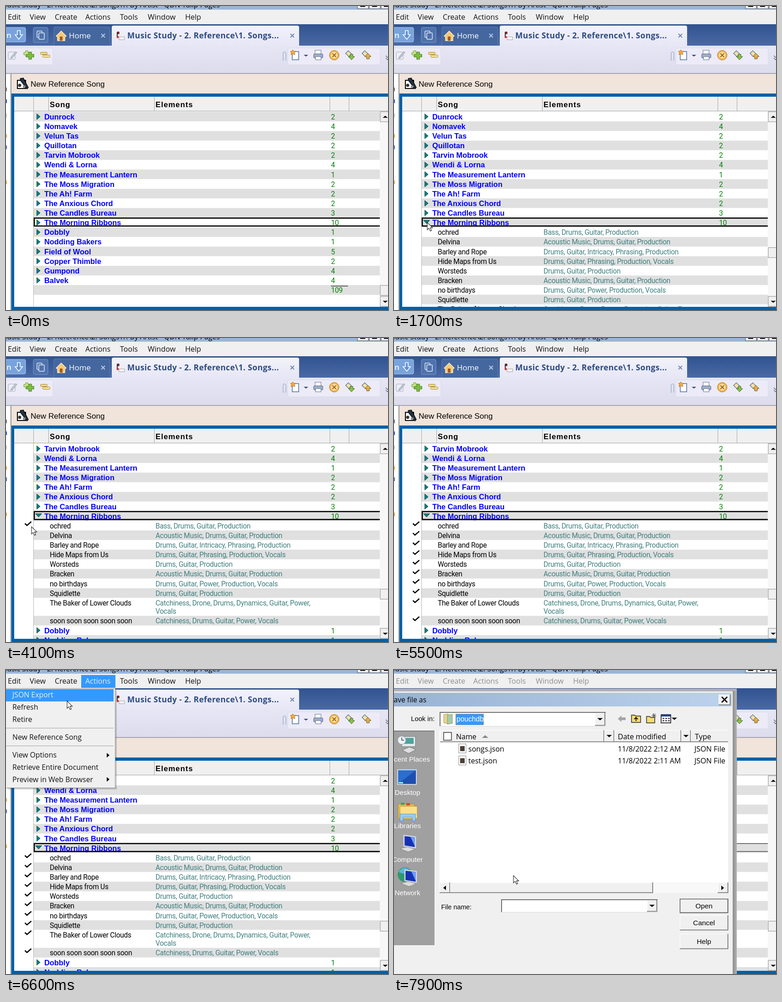
Write an HTML page that moves like this. It is 838 px wide and 667 px high and loops after 8 s.

```html
<!DOCTYPE html>
<html lang="en">
<head>
<meta charset="utf-8">
<title>Music Study</title>
<style>
  html, body { margin: 0; width: 100%; height: 100%; overflow: hidden; background: #f0f0f0; }
  svg { display: block; width: 838px; height: 667px; }
  text { white-space: pre; }
  .ui { font-family: "Open Sans", "Noto Sans", sans-serif; }
  .list { font-family: "Liberation Sans", Arial, sans-serif; }
  .cell { font-family: Roboto, "Liberation Sans", sans-serif; letter-spacing: -.3px; }
  .sel { fill: none; stroke: #000; stroke-width: 2.6; }
  .inactive .sel { stroke-width: 1; }
  .inactive #menu text { fill: #8e8e8e; }
</style>
</head>
<body>
<svg id="stage" viewBox="0 0 838 667" xmlns="http://www.w3.org/2000/svg"></svg>
<script>
const LOOP = 8000, STEP = 100, PITCH = 21.13, EXTRA = 18.4;
const BLUE = '#3399ff', FACE = '#f0f0f0', FRAME = '#0060a8', STRIPE = '#e0e0e0';

// Markup helpers
const rect = (x, y, w, h, fill, more = '') =>
  `<rect x="${x}" y="${y}" width="${w}" height="${h}" fill="${fill}" ${more}/>`;
const path = (d, fill, stroke = 'none', width = 1) =>
  `<path d="${d}" fill="${fill}" stroke="${stroke}" stroke-width="${width}"/>`;
const circle = (x, y, r, fill, more = '') => `<circle cx="${x}" cy="${y}" r="${r}" fill="${fill}" ${more}/>`;
const esc = s => s.replace(/&/g, '&amp;');
const text = (font, x, y, s, size, fill = '#000', more = '') =>
  `<text class="${font}" x="${x}" y="${y}" font-size="${size}" fill="${fill}" ${more}>${esc(s)}</text>`;
const ui = (...a) => text('ui', ...a);
const list = (...a) => text('list', ...a);
const cell = (x, y, s, fill) => text('cell', x, y, s, 15.6, fill);
const group = (id, body, more = '') => `<g id="${id}" ${more}>${body}</g>`;
const bevel = (x, y, w, h) => rect(x, y, w, h, FACE) +
  path(`M${x + .5} ${y + h}V${y + .5}H${x + w}`, 'none', '#fff') +
  path(`M${x} ${y + h - .5}H${x + w - .5}V${y}`, 'none', '#696969', 1.6);
const sunken = (x, y, w, h) => rect(x, y, w, h, '#fff') +
  path(`M${x + 1} ${y + h}V${y + 1}H${x + w}`, 'none', '#707070', 2) +
  path(`M${x} ${y + h - .5}H${x + w - .5}V${y}`, 'none', '#d8d8d8');
const tri = (x, y, dx, dy, fill = '#000') => dx
  ? path(`M${x - dx / 2} ${y - dy}L${x + dx / 2} ${y}L${x - dx / 2} ${y + dy}Z`, fill)
  : path(`M${x - Math.abs(dy) - 1} ${y - dy / 2}h${2 * Math.abs(dy) + 2}L${x} ${y + dy / 2}Z`, fill);

const bands = `Dunrock 2,Nomavek 4,Velun Tas 2,Quillotan 2,Tarvin Mobrook 2,Wendi & Lorna 4,
The Measurement Lantern 1,The Moss Migration 2,The Ah! Farm 2,The Anxious Chord 2,The Candles Bureau 3,
The Morning Ribbons 10,Dobbly 1,Nodding Bakers 1,Field of Wool 5,Copper Thimble 2,Gumpond 4,Balvek 4`
  .split(',').map(s => { const [, name, count] = s.trim().match(/(.+) (\d+)$/); return { name, count }; });
const OPEN = 11;

const songs = [
  ['ochred', 'Bass, Drums, Guitar, Production'],
  ['Delvina', 'Acoustic Music, Drums, Guitar, Production'],
  ['Barley and Rope', 'Drums, Guitar, Intricacy, Phrasing, Production'],
  ['Hide Maps from Us', 'Drums, Guitar, Phrasing, Production, Vocals'],
  ['Worsteds', 'Drums, Guitar, Production'],
  ['Bracken', 'Acoustic Music, Drums, Guitar, Production'],
  ['no birthdays', 'Drums, Guitar, Power, Production, Vocals'],
  ['Squidlette', 'Drums, Guitar, Production'],
  ['The Baker of Lower Clouds', 'Catchiness, Drone, Drums, Dynamics, Guitar, Power,', 'Vocals'],
  ['soon soon soon soon soon', 'Catchiness, Drums, Guitar, Power, Vocals']
].map(([name, ...tags]) => ({ name, tags }));

function bandRow(b, y, open) {
  const mark = open
    ? path(`M64.5 ${y - 5.5}h14l-7 7.5z`, '#008080', '#033', .8)
    : path(`M67.5 ${y - 6.5}v12.5l7.5-6.2z`, '#008080', '#033', .8);
  return mark + list(84, y + 5.8, b.name, 16.4, '#0000ff', 'font-weight="700"') +
    cell(713, y + 5.8, b.count, '#008000');
}

function songRow(s, y) {
  return cell(96, y + 5.8, s.name, '#000') +
    s.tags.map((line, i) => cell(328, y + 5.8 + i * EXTRA, line, '#408080')).join('');
}

function rowsView(id, first, open, thumbY) {
  const rows = bands.slice();
  if (open) rows.splice(OPEN + 1, 0, ...songs);
  else rows.push({ total: '109' });
  let y = 243, out = '', sel = '';
  rows.slice(first).forEach((row, i) => {
    if (y > 675) return;
    const h = PITCH + (row.tags && row.tags[1] ? EXTRA : 0);
    out += rect(61, y - 11, 759, h + .3, (i % 2 === 0) !== open ? STRIPE : '#fff');
    if (row.total) out += rect(713, y - 9.5, 37, 1.3, '#222') + cell(713, y + 5.8, row.total, '#008000');
    else if (row.tags) out += songRow(row, y);
    else out += bandRow(row, y, open && row === bands[OPEN]);
    if (row === bands[OPEN]) sel = `<rect class="sel" x="62" y="${y - 10.1}" width="790" height="17.4"/>`;
    y += h;
  });
  const thumb = rect(821, thumbY, 18, 22, FACE, 'stroke="#8a8a8a"');
  return group(id, `<g clip-path="url(#rows)">${out}${sel}</g>` + thumb);
}

function checks() {
  return songs.map((s, i) => {
    const y = 412 + i * PITCH + (i > 8 ? EXTRA : 0);
    return `<g class="check">${path(`M41.5 ${y - 5}l4.5 4.2 9.5-8.2`, 'none', '#000', 2.6)}</g>`;
  }).join('');
}

function topBars() {
  const menus = [['Edit', 4], ['View', 52], ['Create', 107], ['Actions', 174], ['Tools', 250], ['Window', 311], ['Help', 393]];
  return rect(0, 0, 838, 8, '#9ab5d8') +
    ui(469, 3, 'Music Study - 2. Reference\\2. Songs\\1. By Artist - QDN Tulip Pages', 15.8, '#000', 'text-anchor="end"') +
    [771, 797, 823].map(x => rect(x, -14, 24, 20, FACE, 'stroke="#555"') + rect(x + 6, 0, 11, 2, '#111')).join('') +
    rect(0, 8, 838, 33, FACE) +
    group('hot', rect(165, 11, 75, 28, BLUE)) +
    group('menu', menus.map(([s, x]) => ui(x, 29.5, s, 16.2, '#111', s === 'Actions' ? 'id="actions"' : '')).join('')) +
    rect(0, 40, 838, 48, 'url(#bar)') +
    // Open button and switcher
    rect(-8, 47, 51, 32, '#79a3dc', 'rx="3" stroke="#b4cdf0"') +
    ui(1, 70, 'n', 17, '#fff', 'font-weight="600"') +
    path('M25 54h6v9h5l-8 10-8-10h5z', '#5f8fd2', '#fff', 1.6) +
    rect(60, 47, 32, 33, '#4f72ad', 'rx="3" stroke="#7f9bca"') +
    rect(68, 55, 11, 14, 'none', 'rx="1.5" stroke="#e3ebf8" stroke-width="1.5"') +
    rect(72, 59, 12, 14, '#4f72ad', 'rx="1.5" stroke="#e3ebf8" stroke-width="1.5"') +
    // Home tab
    rect(105, 46, 123, 44, '#45679f', 'rx="3" stroke="#6480b2"') +
    path('M110 66l11-11 11 11-3 2v8h-16v-8z', '#f4c878', '#fff1d0', 1.4) + rect(118, 67, 6, 9, '#a55b20') +
    ui(138, 71, 'Home', 17, '#fff') +
    path('M209 61l8 8m0-8l-8 8', 'none', '#b9c9e6', 2) +
    // Toolbar and active tab
    rect(0, 87, 838, 60, 'url(#tool)') +
    path('M232 88V47q0-4 4-4H639q4 0 4 4V88z', 'url(#tab)') +
    circle(246, 59, 3, '#7a2a20') + rect(243, 57, 2, 10, '#333') + circle(245, 68, 2.5, '#c33') +
    rect(248, 68, 12, 6, '#fff', 'stroke="#999"') +
    ui(266, 71, 'Music Study - 2. Reference\\1. Songs...', 17.4, '#2c4a80', 'font-weight="700" letter-spacing=".4"') +
    path('M624 61l8 8m0-8l-8 8', 'none', '#7487ad', 2);
}

function arrowIcon(x, y, fill, dir) {
  return path(`M${x - 10} ${y - 4}l6-6 7 7-6 6z`, '#f5e2a0', '#4a6a9a', 1.2) +
    `<g transform="translate(${x + 3} ${y + 3}) scale(1 ${dir})">${path('M-3-5h6v5h4l-7 7-7-7h4z', fill, '#4c5d38', 1)}</g>`;
}

function toolbar() {
  const box = 'rx="4" stroke="#d9d9e8"';
  return rect(-8, 92, 111, 37, '#ecebf7', box) + rect(618, 92, 203, 37, '#ecebf7', box) +
    rect(5, 101, 15, 16, '#eceff5', 'stroke="#a2a7b5" rx="2"') + path('M11 112l10-12 3 2-10 12-4 1z', '#c4c8d4', '#8f95a5') +
    path('M43 98h5v4h5v5h-5v4h-5v-4h-4v-5h4z', '#c9e58a', '#6a9a35') +
    path('M50 101h6v5h5v6h-5v5h-6v-5h-5v-6h5z', '#7dc03e', '#477b24', 1.2) +
    rect(75.5, 101.5, 15, 5, '#f2d878', 'rx="2" stroke="#a5843a"') + rect(80.5, 107.5, 16, 5, '#f7e39a', 'rx="2" stroke="#a5843a"') +
    path('M608 120v-17q3-5 6 0v17', 'none', '#a9b4ce', 1.6) +
    rect(628, 100, 14, 18, '#fff', 'stroke="#4e6fa5" stroke-width="1.5"') +
    path('M629 96l2 3 4 0-2 4 1 4-5-2-4 2 1-4-2-4 4 0z', '#f4a93c', '#b06c14', .8) +
    tri(658, 109, 0, 4, '#3c4d77') +
    rect(678, 97, 13, 9, '#fff', 'stroke="#5c6c8c"') + rect(675, 105, 20, 9, '#9fb0cb', 'rx="2" stroke="#4b5c7d"') +
    rect(679, 111, 12, 7, '#fff', 'stroke="#5c6c8c"') +
    circle(720, 108, 10.5, '#f3b64c', 'stroke="#b5761b"') + circle(720, 108, 7, '#fbe5b1') +
    path('M716 104l8 8m0-8l-8 8', 'none', '#a8681c', 2.4) +
    arrowIcon(755, 108, '#86c440', 1) + arrowIcon(791, 108, '#f5a83a', -1) +
    path('M833 109l4 4 4-4m-8 5l4 4 4-4', 'none', '#667', 1.3);
}

function panel() {
  const specks = [[183, '#777'], [209, '#35c'], [240, '#ccc'], [285, '#e8b030'], [310, '#4a70c0'], [387, '#e8b030']];
  return rect(0, 147, 838, 520, '#f4f4f4') + rect(0, 147, 838, 2, '#a6a6b0') +
    rect(0, 149, 9, 518, '#fff') + rect(9, 149, 3, 518, '#c4c4c4') +
    specks.map(([y, c]) => rect(0, y - 4, 2, 8, c)).join('') +
    rect(12, 149, 826, 44, '#f1e4da') + rect(11, 148, 1, 519, '#8a8a8a') +
    rect(25, 163, 18, 18, '#fff', 'stroke="#000" stroke-width="2"') + circle(30, 174, 3.5, '#333') +
    path('M31 159l7-1 11 21-3 3-14-18z', '#234', '#000', 1.2) + circle(40, 177, 3, '#888') +
    list(54, 177, 'New Reference Song', 17.1) +
    rect(12, 192, 826, 475, FRAME) + rect(18, 199, 820, 461, '#fff') +
    rect(18, 199, 820, 31, FACE) + rect(18, 230, 820, 1, '#a0a0a0') +
    [60, 93, 325, 710, 752].map(x => rect(x, 199, 1, 31, '#a5a5a5')).join('') +
    list(96, 222, 'Song', 16.6, '#000', 'font-weight="700" letter-spacing="1"') +
    list(328, 222, 'Elements', 16.6, '#000', 'font-weight="700" letter-spacing="1.1"') +
    rect(60, 231, 1, 429, '#b4b4b4') + rect(820, 231, 18, 429, '#f7f7f7') +
    [232, 637].map(y => rect(821, y, 18, 22, FACE, 'stroke="#8a8a8a"')).join('') +
    tri(832, 243, 0, -4.5) + tri(832, 649, 0, 4.5);
}

function popup() {
  const items = [['Refresh', 86.5], ['Retire', 113.5], ['New Reference Song', 152.5], ['View Options', 192],
    ['Retrieve Entire Document', 219], ['Preview in Web Browser', 245.5]];
  return rect(3, 44, 240, 218, '#000', 'opacity=".18"') +
    rect(-2, 40.5, 241.5, 218, FACE, 'stroke="#9a9a9a"') +
    group('pick', rect(0, 42, 236, 27, BLUE)) +
    ui(14, 60, 'JSON Export', 15.85, '#111', 'id="export"') +
    items.map(([s, y]) => ui(14, y, s, 15.85, '#111')).join('') +
    [127, 166].map(y => rect(0, y, 236, 1, '#a0a0a0')).join('') +
    tri(224, 187, 6, 5) + tri(224, 240, 6, 5);
}

function monitor(x, y) {
  return path(`M${x - 13} ${y - 18}l25 3v24l-25-4z`, '#1632b4', '#d4dbe8', 2.5) +
    path(`M${x + 1} ${y - 15}l10 1.500v20z`, '#6f9cf0') + path(`M${x - 22} ${y + 11}l16-4 18 5-16 6z`, '#dcdcdc', '#777', .8);
}

function places() {
  const names = ['Recent Places', 'Desktop', 'Libraries', 'Computer', 'Network'];
  return rect(0, 133, 90, 472, '#a0a0a0') + path('M0 604.5H89.5V133', 'none', '#fff', 1) + rect(0, 133, 88, 1.5, '#6b6b6b') +
    names.map((s, i) => list(29.5, 201 + i * 73.2, s, 15.3, '#fff', 'text-anchor="middle"')).join('') +
    rect(17, 146, 30, 22, '#e3eaec', 'rx="2" stroke="#6c7c80"') + rect(21, 149, 22, 13, '#4fa39c') +
    circle(17, 154, 9, '#eef2f4', 'stroke="#8a9aa5"') + path('M17 148v6h5', 'none', '#345', 1.5) +
    path('M18 176l16-7 14 6-16 8z', '#ddd', '#777') +
    rect(8, 219, 41, 32, '#2a6fd0', 'stroke="#cfd8e6" stroke-width="2"') + path('M9 250L48 220V250z', '#1d4fb0') + rect(10, 246, 10, 3, '#8fd') +
    rect(9, 294, 36, 32, '#e8bf52', 'rx="2" stroke="#a98224"') + rect(15, 291, 8, 5, '#4aa05a') + rect(27, 292, 8, 5, '#c8513a') +
    rect(13, 299, 38, 27, '#f8e08e', 'rx="2" stroke="#b18f38"') + path('M13 331v-15h34v15h-7v-8H20v8z', '#9ccbf0', '#5b8fc0') +
    monitor(35, 381) + circle(24, 449, 16, '#2f9a6a') + path('M10 443q14-18 28 0-12 8-28 0z', '#5ab4e8') + monitor(37, 457);
}

function fileRow(y, name, time) {
  return rect(142, y - 11, 16, 20, '#fff', 'stroke="#888"') + rect(145, y - 6, 10, 11, '#4a4038') +
    ui(163, y + 5.5, name, 16) + ui(491, y + 5.5, '11/8/2022 ' + time, 15.75) + ui(659, y + 5.5, 'JSON File', 16.2);
}

function dialog() {
  const drop = (x, y, w, h) => bevel(x, y, w, h) + tri(x + w / 2, y + h / 2, 0, 5);
  const button = (y, s, h) => bevel(627, y, 106, h) + list(680, y + h / 2 + 5, s, 15.4, '#000', 'text-anchor="middle"');
  return rect(0, 41, 752, 626, '#b2b2b2') + rect(743, 46, 9, 621, 'url(#edge)') + rect(0, 47, 743, 620, FACE) +
    rect(0, 50, 741, 30, 'url(#caption)') + ui(-9, 71, 'Save file as', 15.6) +
    bevel(712, 54, 26, 23) + path('M719 59l12 12m0-12l-12 12', 'none', '#000', 2.6) +
    list(89, 112, 'Look in:', 14.8, '#000', 'text-anchor="end"') +
    sunken(100, 92, 365, 32) +
    path('M109 98l10-2v22l-10-2z', '#e9d48a', '#b09a50') + path('M117 99l11-2v20l-11 2z', '#a9cba4', '#789c78') +
    rect(135.5, 96.5, 61, 24, BLUE, 'stroke="#c60" stroke-dasharray="1.4"') + list(137, 113, 'pouchdb', 15.6, '#fff') + drop(441, 94, 22, 28) +
    // Folder tools
    path('M491 107l8-7v4h9v6h-9v4z', '#a4a4a4') +
    path('M521 99h7l2 2h11v14h-20z', '#f5dd6c', '#222', 1.4) + path('M531 112v-7m-4 3l4-4 4 4', 'none', '#111', 1.8) +
    path('M554 102h7l2 2h9v12h-18z', '#f5dd6c', '#222', 1.4) + path('M570 95v10m-5-5h10m-8-4l7 8m0-8l-7 8', 'none', '#333', 1) +
    rect(586, 98, 21, 18, '#fff', 'stroke="#111" stroke-width="1.6"') + rect(586, 98, 21, 4, '#23408f') +
    [0, 1, 2].map(i => rect(589 + i * 6, 105, 4, 2.5, '#445') + rect(589 + i * 6, 110, 4, 2.5, '#445')).join('') +
    tri(615, 107, 0, 5) +
    // File list
    rect(100, 132, 633, 334, '#fff') + bevel(101, 132, 360, 26) + drop(461, 132, 22, 26) + bevel(483, 132, 147, 26) +
    drop(630, 132, 21, 26) + bevel(651, 132, 84, 26) + rect(733, 130, 8, 30, FACE) +
    rect(109, 137, 17, 17, '#fff', 'stroke="#444" stroke-width="1.6"') + ui(136, 151.5, 'Name', 16) +
    tri(200, 146, 0, -6, '#888') + ui(491, 151.5, 'Date modified', 16) + ui(660, 151.5, 'Type', 16.3) +
    fileRow(173, 'songs.json', '2:12 AM') + fileRow(199.5, 'test.json', '2:11 AM') +
    rect(100, 466, 633, 23, '#f8f8f8') + bevel(100, 466, 23, 23) + bevel(123, 466, 445, 23) + bevel(710, 466, 23, 23) +
    tri(111, 478, -6, 5) + tri(721, 478, 6, 5) +
    // Name field and buttons
    list(103.5, 524.5, 'File name:', 14.3) + sunken(235, 503, 344, 29) + drop(555, 505, 22, 25) +
    button(502, 'Open', 31) + rect(627.5, 502.5, 105, 30, 'none', 'stroke="#555" stroke-width="1.4"') +
    button(538, 'Cancel', 33) + button(579, 'Help', 33) + places();
}

const gradient = (id, a, b, dir = 'x2="0" y2="1"') =>
  `<linearGradient id="${id}" ${dir}><stop stop-color="${a}"/><stop offset="1" stop-color="${b}"/></linearGradient>`;

document.getElementById('stage').innerHTML =
  `<defs>${gradient('bar', '#31538f', '#4a6aa6')}${gradient('tool', '#e6e6f5', '#dcdcec')}${gradient('tab', '#f3f3fb', '#e6e6f5')}
   ${gradient('edge', '#8c8c8c', '#b4b4b4', '')}${gradient('caption', '#98b3d3', '#bcd2ec', '')}
   <clipPath id="rows"><rect x="18" y="231" width="802" height="429"/></clipPath></defs>` +
  topBars() + toolbar() + panel() +
  rowsView('closed', 0, false, 613) + rowsView('opened', 0, true, 530) + rowsView('scrolled', 4, true, 551) +
  checks() + group('popup', popup()) + group('dialog', dialog()) +
  group('cursor', path('M0 0v16l3.7-3.4 2.8 6.2 2.8-1.2-2.7-6h5z', '#fff', '#222', 1.1));

// Pointer stops: time, x, y (no place means hidden)
const pointer = [
  [0], [500, 1, 384], [600, 48, 436], [700, 112, 474], [800, 156, 480], [900, 150, 479], [1000, 146, 478],
  [1200, 138, 481], [1300, 114, 483], [1400, 90, 480], [1500, 77, 477], [1600, 73, 475],
  [1900, 88, 456], [2000, 132, 470], [2100, 178, 494], [2200, 201, 511], [2300, 200, 509],
  [2800, 27, 487], [2900, 22, 476], [3000, 24, 462], [3100, 29, 448], [3200, 36, 436], [3300, 44, 425],
  [3400, 51, 417], [3500, 57, 412], [3600, 59, 411], [3700, 60, 412], [3800, 57, 411], [3900, 55, 410],
  [4100, 56, 414], [4200, 60, 438], [4300, 65, 484], [4400, 66, 548], [4500, 63, 598], [4600, 60, 612],
  [5000, 108, 520], [5100, 248, 175], [5200],
  [5600, 214, 62], [5700, 201, 32], [5800, 197, 25],
  [6200, 195, 32], [6300, 184, 46], [6400, 164, 60], [6500, 145, 66], [6600, 134, 68],
  [7700, 178, 205], [7800, 240, 398], [7900, 262, 451]
];
const ticks = [[0, 0], [4100, 1], [4200, 2], [4300, 4], [4400, 7], [4500, 9], [4600, 10]];

const at = (table, t) => table.filter(k => k[0] <= t).pop();
const $ = id => document.getElementById(id);
const show = (node, on) => { node.style.display = on ? '' : 'none'; };
const marks = [...document.querySelectorAll('.check')];

function draw(now) {
  const t = Math.floor(now % LOOP / STEP) * STEP;
  const within = (a, b) => t >= a && t < b;
  show($('closed'), t < 1700);
  show($('opened'), within(1700, 2800));
  show($('scrolled'), t >= 2800);
  const done = at(ticks, t)[1];
  marks.forEach((m, i) => show(m, i < done));

  const hot = within(5700, 7300), pick = within(6300, 7300);
  show($('hot'), hot);
  $('actions').style.fill = hot ? '#e8f3ff' : '';
  show($('popup'), within(6000, 7300));
  show($('pick'), pick);
  $('export').style.fill = pick ? '#e8f3ff' : '';
  show($('dialog'), t >= 7400);
  $('stage').classList.toggle('inactive', t >= 7300);

  const [, x, y] = at(pointer, t);
  show($('cursor'), x !== undefined);
  if (x !== undefined) $('cursor').setAttribute('transform', `translate(${x} ${y})`);
}

function tick() {
  draw(performance.now());
  requestAnimationFrame(tick);
}
tick();
</script>
</body>
</html>
```
